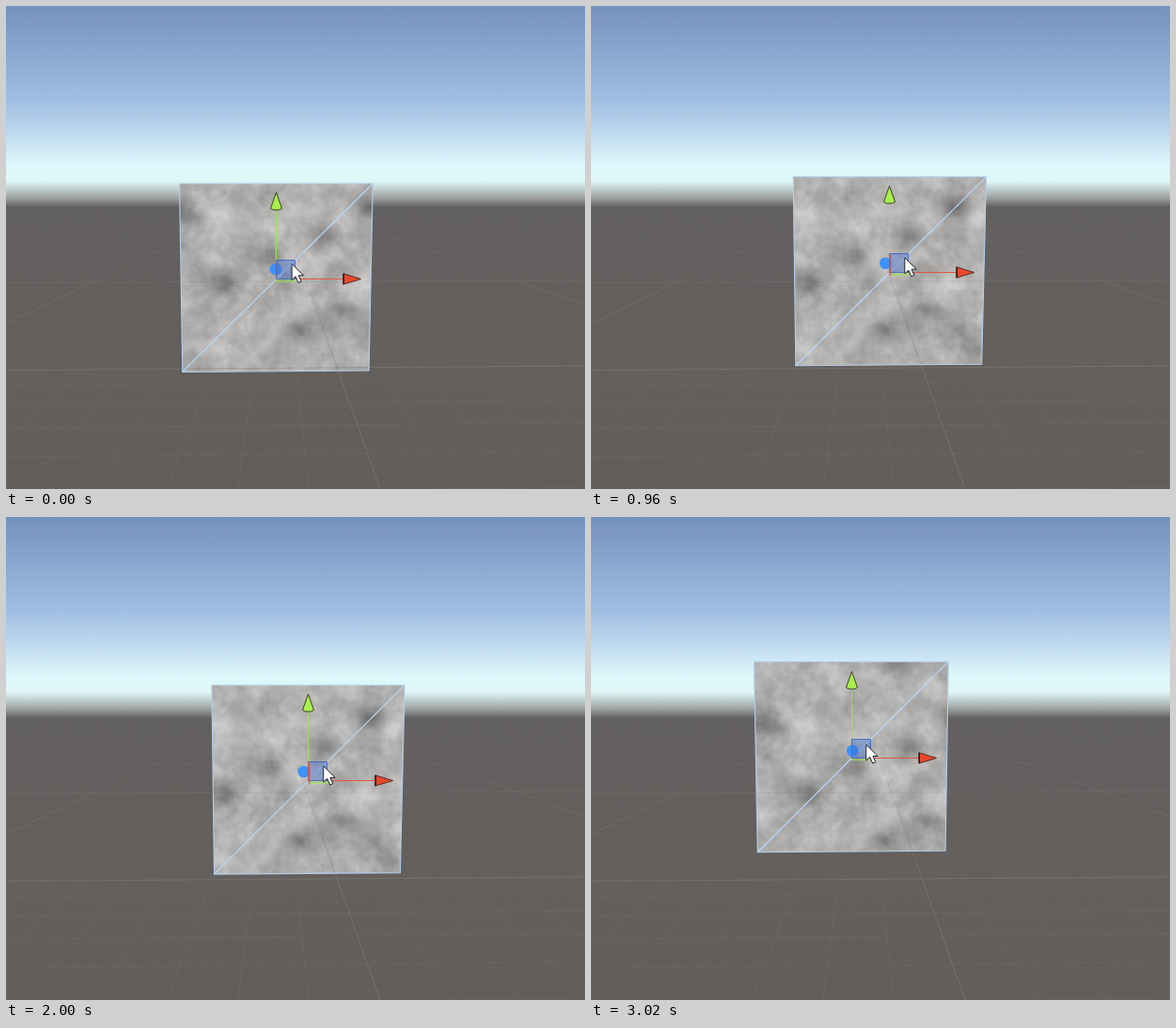
Animation, 616 px wide and 514 px high, one loop 3.46 s. Source, as an HTML page with a canvas:

```html
<!DOCTYPE html>
<html lang="en">
<head>
<meta charset="utf-8">
<title>Moving a noise quad</title>
<style>
html, body { margin: 0; width: 100%; height: 100%; overflow: hidden; background: #625f5a; }
canvas { display: block; width: 616px; height: 514px; }
</style>
</head>
<body>
<canvas id="stage" width="616" height="514"></canvas>
<script>
const W = 616, H = 514, LOOP = 3460, STEP = 20;
const ctx = document.getElementById('stage').getContext('2d');
const clamp = (v, lo, hi) => Math.max(lo, Math.min(hi, v));
const mix = (a, b, s) => a + (b - a) * s;

// The object is swung around a centre: time, angle in degrees, radius
const CX = 277, CY = 256;
const swing = [
  [0, -73.6, 35.4], [400, 102.5, 46], [960, 326, 48.3], [1360, 487, 50],
  [2000, 691, 50], [2500, 812, 23], [3020, 900, 0.5]
];

function sample(keys, t) {
  const last = keys.length - 1;
  if (t >= keys[last][0]) return keys[last].slice(1);
  const i = keys.findIndex((k, n) => t < keys[n + 1][0]);
  const a = keys[i], b = keys[i + 1], span = b[0] - a[0];
  const s = (t - a[0]) / span;
  const slope = (n, c) => {
    const p = keys[Math.max(0, n - 1)], q = keys[Math.min(last, n + 1)];
    return n === last ? 0 : (q[c] - p[c]) / (q[0] - p[0]);
  };
  return [1, 2].map(c =>
    mix(a[c], b[c], s * s * (3 - 2 * s)) +
    span * s * (1 - s) * ((1 - s) * slope(i, c) - s * slope(i + 1, c)));
}

function position(t) {
  const [angle, radius] = sample(swing, t);
  const a = angle * Math.PI / 180;
  return [CX + radius * Math.cos(a), CY - radius * Math.sin(a)];
}

function layer(w, h, draw) {
  const c = document.createElement('canvas');
  c.width = w;
  c.height = h;
  draw(c.getContext('2d'));
  return c;
}

function line(g, x1, y1, x2, y2, color, width = 1) {
  g.strokeStyle = color;
  g.lineWidth = width;
  g.beginPath();
  g.moveTo(x1, y1);
  g.lineTo(x2, y2);
  g.stroke();
}

function poly(g, points, fill, stroke, width = 1) {
  g.beginPath();
  points.forEach(p => g.lineTo(p[0], p[1]));
  g.closePath();
  if (fill) { g.fillStyle = fill; g.fill(); }
  if (stroke) { g.strokeStyle = stroke; g.lineWidth = width; g.stroke(); }
}

// floor grid in perspective: rows at depth n, rails meeting at the vanishing point
const VX = 287, VY = 201, DEPTH = 185;

function fadeIn(g, from, to, alpha, tone = 142) {
  const fade = g.createLinearGradient(0, from, 0, to);
  fade.addColorStop(0, `rgba(${tone},${tone - 3},${tone - 8},0)`);
  fade.addColorStop(1, `rgba(${tone},${tone - 3},${tone - 8},${alpha})`);
  return fade;
}

function row(g, depth, color) {
  const y = VY + DEPTH / depth;
  line(g, 0, y + 1.5 / depth, W, y - 3 / depth, color);
}

function rail(g, x, color) {
  line(g, VX, VY, x, H, color);
}

const backdrop = layer(W, H, g => {
  const fill = g.createLinearGradient(0, 0, 0, H);
  [[0, '#7591bd'], [100, '#a0bee2'], [140, '#c2dcf1'], [168, '#dcf7fb'],
   [186, '#e0f8f8'], [204, '#9ea4a3'], [214, '#636060'], [H, '#625f5a']]
    .forEach(([y, color]) => fill.addColorStop(y / H, color));
  g.fillStyle = fill;
  g.fillRect(0, 0, W, H);

  const major = fadeIn(g, 205, 390, 0.42), minor = fadeIn(g, 320, 420, 0.15);
  for (let n = 1; n < 6; n++) row(g, n, major);
  for (let n = 1; n < 6; n++) row(g, 1 - n * 0.083, minor);
  for (let n = -1; n < 2; n++) rail(g, 398 + n * 768, major);
  for (let n = -11; n < 12; n++) if (n) rail(g, 398 + n * 75.5, minor);
});

// cloud texture, fixed in the world while the quad slides over it
const TX = 100, TY = 90, TW = 350, TH = 325;
const darkSpots = [
  [231, 293], [183, 221], [357, 323], [312, 347], [338, 243],
  [275, 268], [385, 214], [232, 136], [322, 148], [152, 121]
];

function hash(x, y, seed) {
  let h = Math.imul(x, 374761393) + Math.imul(y, 668265263) + Math.imul(seed, 974711);
  h = Math.imul(h ^ (h >>> 13), 1274126177);
  return ((h ^ (h >>> 16)) >>> 0) / 4294967296;
}

function valueNoise(x, y, seed) {
  const ix = Math.floor(x), iy = Math.floor(y);
  const ease = v => v * v * (3 - 2 * v);
  const u = ease(x - ix), v = ease(y - iy);
  return mix(mix(hash(ix, iy, seed), hash(ix + 1, iy, seed), u),
             mix(hash(ix, iy + 1, seed), hash(ix + 1, iy + 1, seed), u), v) - 0.5;
}

const clouds = layer(TW, TH, g => {
  const image = g.createImageData(TW, TH);
  for (let py = 0; py < TH; py++) for (let px = 0; px < TW; px++) {
    const x = px + TX, y = py + TY;
    const a = (x + y) * 0.707, b = (x - y) * 0.707;
    let level = 178;
    for (let n = 0; n < 4; n++) {
      const size = 32 / 2 ** n;
      level += 34 * 0.72 ** n * valueNoise(a / size, b / size, n + 3);
    }
    for (const [cx, cy] of darkSpots) {
      level -= 52 * Math.exp(-((x - cx) ** 2 + 1.7 * (y - cy) ** 2) / 300);
    }
    level = clamp(level, 82, 207);
    image.data.set([level, level - 1, level - 3, 255], (py * TW + px) * 4);
  }
  g.putImageData(image, 0, 0);
});

function drawQuad(x, y) {
  const up = (290 - y) / 79, lean = (x - CX) / 45;
  const top = y - 101.5 - 2.5 * up, bottom = y + 98 + 3 * up;
  const tr = [x + 103 + up, top];
  const bl = [x - 99.5, bottom + 1];
  const corners = [[x - 103 - up + lean, top], tr,
    [x + 99 + 3 * up - lean, bottom - 0.5], bl];
  ctx.save();
  poly(ctx, corners);
  ctx.clip();
  ctx.drawImage(clouds, TX, TY);
  const shade = fadeIn(ctx, 220, 390, 0.3, 90);
  row(ctx, 1, shade);
  row(ctx, 2, shade);
  rail(ctx, 398, shade);
  ctx.restore();
  poly(ctx, corners, null, '#b4d0ee', 1.1);
  line(ctx, ...bl, ...tr, '#b9d8f6', 1.2);
}

function drawGizmo(x, y) {
  const zx = (283 - x) / 8, zy = -4 - (y - 211) * 0.08;
  const dx = -zx * 0.3, dy = -zy * 0.3, size = 20;
  const sideAlpha = clamp(Math.abs(x - CX) / 30, 0, 1) ** 2;

  ctx.fillStyle = '#3d91f7';
  ctx.beginPath();
  ctx.arc(x + zx, y + zy, 6.3, 0, Math.PI * 2);
  ctx.fill();

  line(ctx, x, y, x, y - 74, '#9be052');
  line(ctx, x, y, x + 72, y, '#e0573f');

  poly(ctx, [[x, y], [x + size, y], [x + size + dx, y + dy], [x + dx, y + dy]],
    'rgba(150,225,70,.35)', 'rgba(160,230,80,.65)');
  poly(ctx, [[x, y], [x + size, y], [x + size, y - size], [x, y - size]],
    'rgba(60,105,205,.42)', 'rgba(58,100,200,.85)');
  poly(ctx, [[x, y], [x, y - size], [x + dx, y - size + dy], [x + dx, y + dy]],
    null, `rgba(230,70,45,${sideAlpha * 0.8})`);

  poly(ctx, [[x, y - 92], [x + 6, y - 75], [x + 3, y - 73.5], [x - 3, y - 73.5], [x - 6, y - 75]],
    '#a9f04f', '#30301f', 0.9);
  poly(ctx, [[x + 90, y], [x + 72, y - 5.5], [x + 72, y + 5.5]], '#e8492d', '#4c241c', 0.9);
  line(ctx, x + 71.5, y - 6, x + 71.5, y + 6, '#201512', 1.4);
}

function drawPointer(x, y) {
  const shape = [[0, 0], [0, 17], [4, 13.3], [7, 20], [10, 18.7], [7.2, 12.3], [12.3, 12.3]];
  poly(ctx, shape.map(([px, py]) => [x + px, y + py]), '#fff', '#222', 1);
}

const start = performance.now();
function render(now) {
  const t = Math.floor((Math.max(0, now - start) % LOOP) / STEP) * STEP;
  const [x, y] = position(t);
  const gx = Math.round(x) + 0.5, gy = Math.round(y) + 0.5;
  const sink = y - 250;
  ctx.drawImage(backdrop, 0, 0);
  drawQuad(x + 0.3, y + 0.5);
  drawGizmo(gx, gy);
  drawPointer(gx + 15 + sink / 25, gy - 14 - sink / 20);
  requestAnimationFrame(render);
}
render(start);
</script>
</body>
</html>
```
